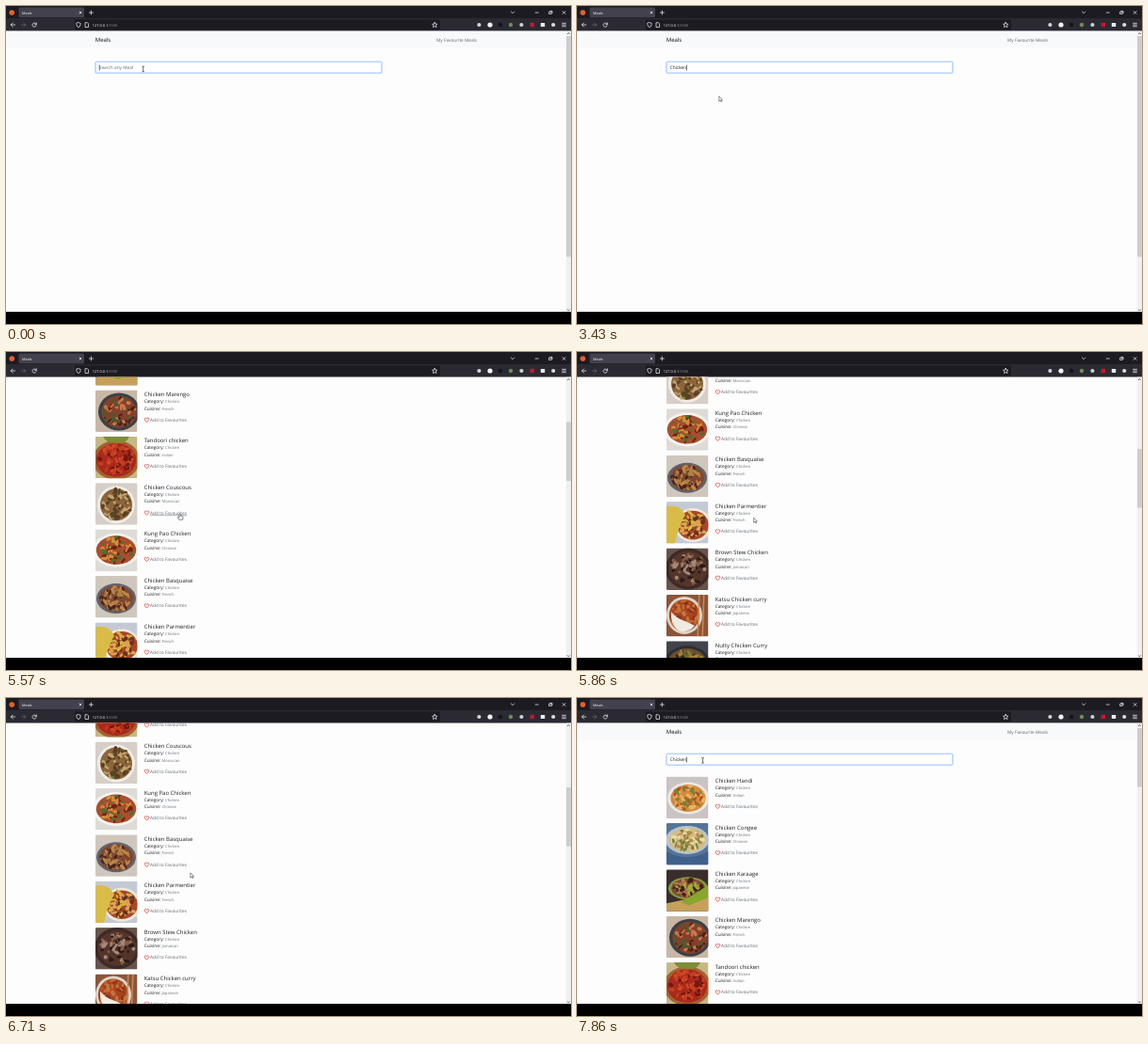
An HTML page for the animation above (8000 ms loop, 600 by 338 pixels).

```html
<!DOCTYPE html>
<html lang="en">
<head>
<meta charset="utf-8">
<title>Meals</title>
<style>
html, body { margin: 0; width: 100%; height: 100%; overflow: hidden; background: #000; }
svg { display: block; }
#stage { width: 100vw; height: 100vh; }
text { font-family: "Open Sans", "Noto Sans", sans-serif; font-size: 4.78px; fill: #1d2125; text-rendering: geometricPrecision; white-space: pre; }
.h { font-size: 5.97px; }
.muted { fill: #616a72; }
.small { font-size: 4.18px; fill: #6c757d; }
.over { text-decoration: underline; }
.line { fill: none; stroke: #fbfbfe; stroke-width: .7; stroke-linecap: round; stroke-linejoin: round; }
.dim { stroke: #6b6a73; }
.heart { fill: none; stroke: #dc3d35; stroke-width: .8; stroke-linejoin: round; }
</style>
</head>
<body>
<svg id="stage" viewBox="0 0 600 338">
  <defs>
    <clipPath id="view"><rect y="26.5" width="600" height="298.5"/></clipPath>
    <clipPath id="photo"><rect width="44.5" height="44.5" rx="1.3"/></clipPath>
  </defs>

  <rect width="600" height="338"/>
  <rect width="600" height="13.5" fill="#1c1b22"/>
  <rect y="13" width="600" height="13.5" fill="#2b2a33"/>
  <rect y="26.5" width="600" height="298.5" fill="#fdfdfd"/>

  <g clip-path="url(#view)">
    <g id="page">
      <rect y="26.5" width="595" height="17.5" fill="#f8f9fa"/>
      <text class="h" x="94.8" y="38.2" style="fill:#111">Meals</text>
      <text x="457" y="37.7" style="fill:#666768">My Favourite Meals</text>
      <rect x="94.2" y="58.4" width="305.6" height="13.6" rx="2" fill="#c2dbfe"/>
      <rect x="95.3" y="59.5" width="303.4" height="11.4" rx="1.2" fill="#fff" stroke="#86b7fe" stroke-width=".5"/>
      <text id="hint" class="muted" x="98.8" y="67.2">Search any Meal</text>
      <text id="typed" x="98.8" y="67.2"></text>
      <rect id="caret" y="62.6" width=".6" height="5.9" fill="#222"/>
      <g id="list"></g>
    </g>
    <rect x="594.7" y="26.5" width="5.3" height="298.5" fill="#f0f0f0"/>
    <path d="M596 30 597.4 28.4 598.8 30M596 322.4 597.4 324 598.8 322.4" fill="none" stroke="#555" stroke-width=".8"/>
    <rect id="thumb" x="595" y="32" width="4.8" fill="#cdcdcd"/>
  </g>

  <circle cx="6.2" cy="7" r="2.8" fill="#e8602c"/>
  <rect x="13.5" y="1.5" width="69.5" height="10.8" rx="1.3" fill="#42414d"/>
  <text x="17" y="8.5" style="fill:#fbfbfe;font-size:3.85px">Meals</text>
  <path class="line" d="M78 6l2 2m0-2l-2 2M88.4 7h4M90.4 5v4M536.4 6l1.7 1.7L539.8 6M562.2 7h3M591.2 5.6l2.8 2.8m0-2.8l-2.8 2.8M577 6.2h2.2v2.2H577zM577.8 5.4h2.2v2.2"/>
  <path class="line" d="M5.2 20h4.4M7.2 18l-2 2 2 2M32 19.2a2.1 2.1 0 1 0 .1 1.6M32.3 17.8v1.6h-1.6"/>
  <path class="line dim" d="M16.4 20h4.4M18.8 18l2 2-2 2"/>
  <rect x="73" y="14.6" width="388" height="10.8" rx="1.3" fill="#1c1b22"/>
  <path class="line" d="M77 17.6l2.2.8c0 2-.5 3.5-2.2 4.3-1.7-.8-2.2-2.3-2.2-4.3zM84.4 17.7h2l1.2 1.2v3.6h-3.2zM455.3 17.4l.8 1.7 1.9.2-1.4 1.3.4 1.9-1.7-.9-1.7.9.4-1.9-1.4-1.3 1.9-.2z"/>
  <text x="91.8" y="21.5" style="fill:#fbfbfe;font-size:3.9px">127.0.0.1<tspan fill="#8f8e99">:5500</tspan></text>
  <circle cx="502.4" cy="20" r="2.1" fill="#d5d5da"/>
  <circle cx="514" cy="20" r="2.6" fill="#f4f4f6"/>
  <circle cx="525" cy="20" r="2.3" fill="#15141a"/>
  <circle cx="536" cy="20" r="2.2" fill="#708a55"/>
  <circle cx="547.4" cy="20" r="2.1" fill="#c9d5d0"/>
  <rect x="556.6" y="17.8" width="4.4" height="4.4" fill="#c3172b"/>
  <rect x="567.8" y="18" width="4.4" height="4" fill="#f0f0f3"/>
  <circle cx="581.2" cy="20" r="2.1" fill="#dcdce0"/>
  <path class="line" d="M590.6 18.3h3.8M590.6 20h3.8M590.6 21.7h3.8"/>

  <g id="pointer">
    <path id="beam" d="M-1.3-2.9Q0-2.9 0-2.2 0-2.9 1.3-2.9M0-2.3V2.3M-1.3 2.9Q0 2.9 0 2.2 0 2.9 1.3 2.9" fill="none" stroke="#222" stroke-width=".65"/>
    <path id="arrow" d="M0 0V5.2L1.2 4.1 2 5.9 2.9 5.5 2.1 3.8H3.7Z" fill="#fff" stroke="#222" stroke-width=".5"/>
    <path id="hand" d="M-.7 .5Q0-.4 .6 .5V2.5L2.9 3.1Q3.7 3.4 3.5 4.6L2.9 6.8H-.6L-2.3 4.3Q-2.2 3.5-1.4 3.8L-.7 4.4Z" fill="#fff" stroke="#222" stroke-width=".55"/>
  </g>
</svg>

<script>
const $ = id => document.getElementById(id);
const LOOP = 8000, STEP = 1000 / 7, LAST = 55;
const TOP = 83.5, PITCH = 49.4;
const QUERY = "Chicken", TYPE_AT = 12, ENTER_AT = 22, FOUND_AT = 25;

// name, cuisine, backdrop, dish rim, food, three garnish colours, dish centre x, y, radii
const meals = [
  ["Chicken Handi", "Indian", "#c9c3c3", "#ece8e4", "#d58a3c", "#b4531d", "#e8b365", "#7d7f35", 23, 23, 22, 17],
  ["Chicken Congee", "Chinese", "#557499", "#b9c3cc", "#d3bd85", "#eadca9", "#77803d", "#b58a47", 22, 18, 23, 15],
  ["Chicken Karaage", "Japanese", "#3b2d2b", "#86993a", "#7b4a31", "#b5754b", "#3f2119", "#9eae37", 23, 20, 21, 12],
  ["Chicken Marengo", "French", "#c9b7a5", "#3b4048", "#84402c", "#c97748", "#4b2119", "#4f592c", 25, 23, 22, 20],
  ["Tandoori chicken", "Indian", "#c6b886", "#a5622f", "#a92a1c", "#d34b28", "#74160f", "#c4401f", 22, 25, 25, 21],
  ["Chicken Couscous", "Moroccan", "#d6cec7", "#f0ece6", "#8b653b", "#c6a36c", "#4e4b25", "#5f3b23", 22, 23, 20, 20],
  ["Kung Pao Chicken", "Chinese", "#dedbd6", "#f5f2ee", "#a84f2d", "#d88b35", "#4b7134", "#722017", 22, 22, 25, 18],
  ["Chicken Basquaise", "French", "#cfc7bd", "#62626a", "#80472f", "#c18449", "#4a2520", "#a98340", 22, 24, 21, 16],
  ["Chicken Parmentier", "French", "#c3cad4", "#f0e9de", "#a9472a", "#d8b640", "#68301f", "#dba656", 28, 25, 20, 18],
  ["Brown Stew Chicken", "Jamaican", "#68534b", "#3d2a27", "#54352a", "#8a5c45", "#281918", "#a58a78", 23, 22, 24, 22],
  ["Katsu Chicken curry", "Japanese", "#8b5539", "#ddd5c9", "#a8441f", "#c96831", "#86351a", "#c27742", 19, 22, 19, 20],
  ["Nutty Chicken Curry", "Indian", "#42444c", "#2b2d35", "#6c502b", "#a7813c", "#3a2818", "#676a36", 22, 23, 24, 18],
  ["General Tso's Chicken", "Chinese", "#c0b8ad", "#dcd8d1", "#9c4a2e", "#d0794a", "#602820", "#64803f", 22, 23, 21, 21],
  ["Cedarland Fried Chicken", "American", "#d8cec4", "#b74e32", "#b86b36", "#d99850", "#914622", "#c84732", 22, 24, 22, 19]
];

// extra flat shapes for single photos: [meal, path, colour]
const extras = [
  [1, "M0 30Q22 42 44.5 30V44.5H0Z", "#41618d"],
  [2, "M0 36 44.5 27V44.5H0Z", "#c6a05b"],
  [2, "M15 35 44 17V30L24 38Z", "#87a62c"],
  [4, "M8 0H36Q33 8 22 7 11 7 8 0Z", "#7d8d38"],
  [8, "M0 5Q14 2 20 14 12 28 9 44.5H0Z", "#d9bc48"],
  [10, "M5 18Q9 24 17 27 25 30 30 33 24 40 15 39 4 34 5 18Z", "#f0eae0"],
  [10, "M34 0h1.5L34 44.5h-1.5ZM39 0h1.5L39 44.5h-1.5Z", "#c98a58"]
];

function seeded(n) {
  return () => (n = (n * 16807) % 2147483647) / 2147483647;
}

function photo(meal, i) {
  const [, , back, rim, food, c1, c2, c3, cx, cy, rx, ry] = meal;
  const rnd = seeded(i * 7919 + 431);
  let out = `<rect width="44.5" height="44.5" fill="${back}"/>` +
    `<ellipse cx="${cx}" cy="${cy}" rx="${rx}" ry="${ry}" fill="${rim}"/>` +
    `<ellipse cx="${cx}" cy="${cy}" rx="${rx * .85}" ry="${ry * .85}" fill="${food}"/>`;
  for (let n = 0; n < 60; n++) {
    const a = rnd() * 6.283, d = Math.sqrt(rnd()) * .76;
    const x = cx + Math.cos(a) * d * rx, y = cy + Math.sin(a) * d * ry;
    const w = 1.2 + rnd() * 2.6, h = .8 + rnd() * 1.3;
    out += `<ellipse rx="${w}" ry="${h}" fill="${[c1, c2, c3][n % 3]}" ` +
      `transform="translate(${x} ${y}) rotate(${rnd() * 180})"/>`;
  }
  for (const [m, d, colour] of extras) {
    if (m === i) out += `<path d="${d}" fill="${colour}"/>`;
  }
  return `<g class="photo" clip-path="url(#photo)">${out}</g>`;
}

const heart = "M54.5 34.1 52.6 32.1C51.3 30.6 53.3 28.6 54.5 30.4 55.7 28.6 57.7 30.6 56.4 32.1Z";

$("list").innerHTML = meals.map((m, i) => `<g transform="translate(95 ${TOP + i * PITCH})">
  ${photo(m, i)}
  <text class="h" x="51.7" y="6.7">${m[0]}</text>
  <text x="51.7" y="13.7">Category: <tspan class="small">Chicken</tspan></text>
  <text x="51.7" y="21.2">Cuisine: <tspan class="small">${m[1]}</tspan></text>
  <path class="heart" d="${heart}"/>
  <text class="link muted" x="58" y="33.4">Add to Favourites</text>
</g>`).join("");

const photos = [...document.querySelectorAll(".photo")];
const links = [...document.querySelectorAll(".link")];

// [step, x, y]
const pointerPath = [
  [22, 145.7, 67], [26, 156, 125], [31, 180, 235], [33, 212, 258], [34, 222, 246],
  [36, 208, 205], [38, 188, 176], [39, 184.6, 171.5], [45, 193.9, 185.3],
  [49, 197.8, 186.3], [51, 187, 165], [53, 150, 88], [55, 133.6, 66.4]
];
// [step, offset]: the wheel turns at an even rate, down and back up
const scrollPath = [[36, 0], [39, 191.3], [43.5, 480], [45, 414], [49, 154], [51.4, 0]];

function along(path, k, col) {
  if (k <= path[0][0]) return path[0][col];
  for (let i = 1; i < path.length; i++) {
    const a = path[i - 1], b = path[i];
    if (k <= b[0]) return a[col] + (b[col] - a[col]) * (k - a[0]) / (b[0] - a[0]);
  }
  return path[path.length - 1][col];
}

function show(el, on) {
  el.style.display = on ? "" : "none";
}

function pointerKind(x, y, found) {
  if (y > 59 && y < 72 && x < 399) return { kind: "beam" };
  const row = Math.floor((y - TOP) / PITCH), dy = y - TOP - row * PITCH;
  if (!found || row < 0 || x < 147) return { kind: "arrow" };
  if (dy > 27.5 && dy < 35.5 && x < 192) return { kind: "hand", row };
  const onText = (dy < 9 && x < 196) || (dy > 9 && dy < 24 && x < 184);
  return { kind: onText ? "beam" : "arrow" };
}

// blinks every four steps; a key press starts it anew
function caretOn(k) {
  const since = k < TYPE_AT ? k + 2 : k < ENTER_AT ? Math.max(0, k - 17) : k - ENTER_AT;
  return Math.floor(since / 4) % 2 === 0;
}

function draw(t) {
  const k = Math.min(LAST, Math.floor((t + 5) / STEP));
  const found = k >= FOUND_AT;

  const count = k < TYPE_AT ? 0 : k < 15 ? k - TYPE_AT + 1 : Math.min(QUERY.length, k - 10);
  $("typed").textContent = QUERY.slice(0, count);
  show($("hint"), !count);
  $("caret").setAttribute("x", 98.8 + (count ? $("typed").getComputedTextLength() + .2 : 0));
  show($("caret"), caretOn(k));

  show($("list"), found);
  photos.forEach((p, i) => show(p, k > FOUND_AT + i / 3));

  const scroll = along(scrollPath, k, 1);
  $("page").setAttribute("transform", `translate(0 ${-scroll})`);
  $("thumb").setAttribute("y", 32 + scroll * .222);
  $("thumb").setAttribute("height", found ? 62.5 : 234.5);

  const x = along(pointerPath, k, 1), y = along(pointerPath, k, 2);
  const hit = pointerKind(x, y + scroll, found);
  $("pointer").setAttribute("transform", `translate(${x} ${y})`);
  for (const kind of ["beam", "arrow", "hand"]) show($(kind), kind === hit.kind);
  links.forEach((l, i) => l.classList.toggle("over", i === hit.row));
}

const start = performance.now();
function tick(now) {
  draw(Math.max(0, now - start) % LOOP);
  requestAnimationFrame(tick);
}
draw(0);
requestAnimationFrame(tick);
</script>
</body>
</html>
```
